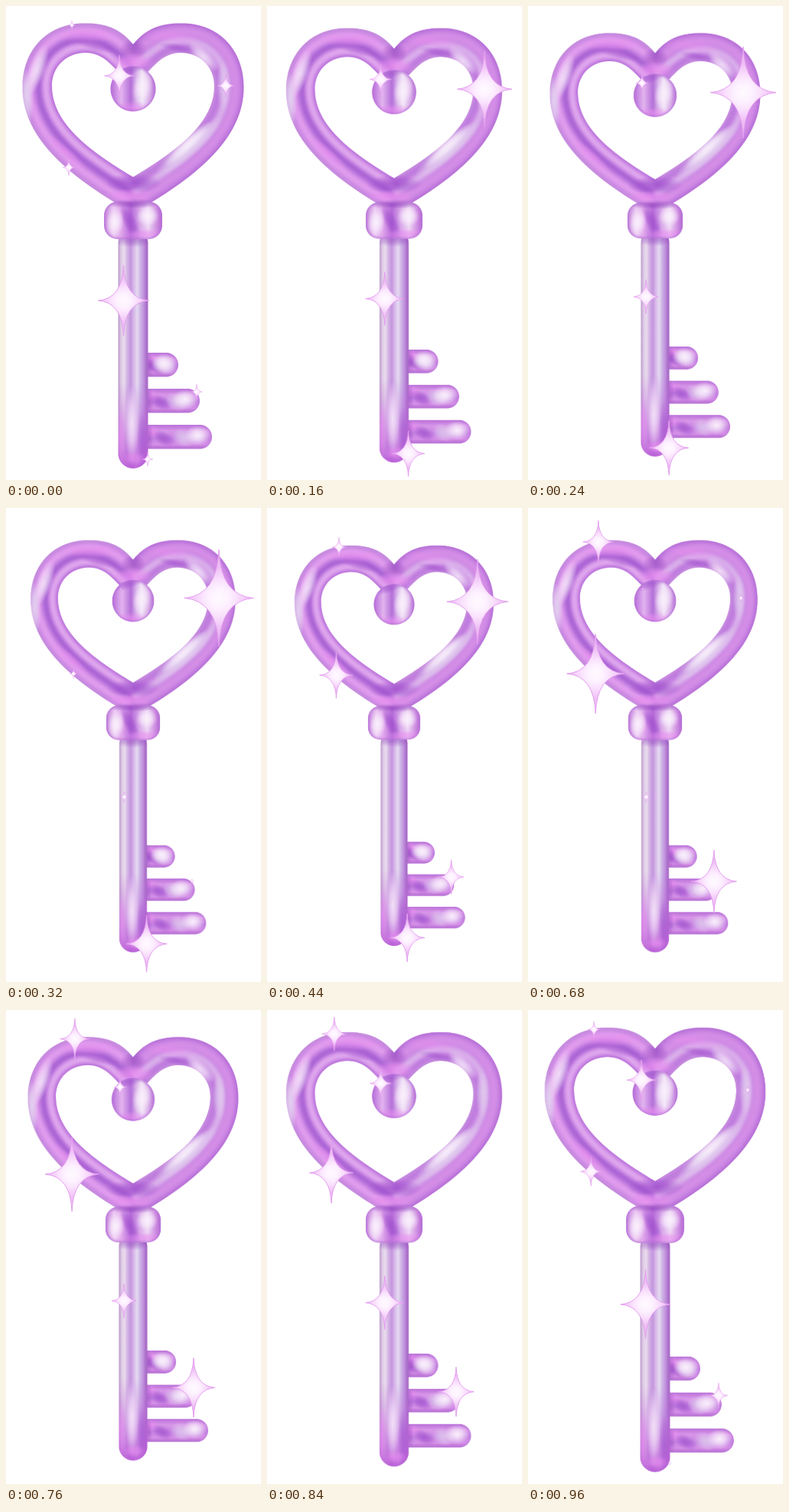
Recreate the animation shown at these times as an HTML page with a canvas. Size 333x618 px, loop 1 s.

```html
<!DOCTYPE html>
<html lang="en">
<head>
<meta charset="utf-8">
<title>Heart key</title>
<style>
html, body { margin: 0; width: 100%; height: 100%; overflow: hidden; background: #fff; }
canvas { display: block; }
</style>
</head>
<body>
<canvas id="stage"></canvas>
<script>
const W = 333, H = 618, LOOP = 1000, STEP = 40;
const CX = 166, CY = 285, RES = 2;

function setup(canvas, res) {
  canvas.width = W * res;
  canvas.height = H * res;
  const c = canvas.getContext('2d');
  c.scale(res, res);
  return c;
}

const stage = document.getElementById('stage');
const dpr = window.devicePixelRatio || 1;
const ctx = setup(stage, dpr);
stage.style.width = W + 'px';
stage.style.height = H + 'px';
const key = document.createElement('canvas');
const g = setup(key, RES);

// Left half of the heart, from the cleft to the lower tip.
const OUTER = [166, 50, 148, 28, 128, 22.5, 103, 22.5, 53, 22.5, 21.5, 58, 21.5, 106, 21.5, 175, 88, 226, 166, 270];
const INNER = [166, 96, 148, 100, 138, 61, 104, 61, 78, 61, 60, 80, 60, 104, 60, 152, 107, 188, 166, 223];

function halfHeart(k, mirror) {
  const p = OUTER.map((v, i) => v + (INNER[i] - v) * k);
  if (mirror) for (let i = 0; i < p.length; i += 2) p[i] = 2 * CX - p[i];
  const path = new Path2D();
  path.moveTo(p[0], p[1]);
  for (let i = 2; i < p.length; i += 6) path.bezierCurveTo(...p.slice(i, i + 6));
  return path;
}

function box(x, y, w, h, r) {
  const path = new Path2D();
  path.roundRect(x, y, w, h, r);
  return path;
}

function disc(x, y, r) {
  const path = new Path2D();
  path.arc(x, y, r, 0, 7);
  return path;
}

function inside(path, draw, rule = 'nonzero') {
  g.save();
  g.clip(path, rule);
  draw();
  g.restore();
}

function soft(path, color, width, blur) {
  g.filter = `blur(${blur * RES}px)`;
  g.strokeStyle = color;
  g.lineWidth = width;
  g.stroke(path);
  g.filter = 'none';
}

// Soft elliptical spot of one colour.
function glow(x, y, rx, ry, rgb, alpha = 1, turn = 0) {
  g.save();
  g.translate(x, y);
  g.rotate(turn);
  g.scale(rx, ry);
  const f = g.createRadialGradient(0, 0, 0, 0, 0, 1);
  f.addColorStop(0, `rgba(${rgb},${alpha})`);
  f.addColorStop(0.45, `rgba(${rgb},${alpha * 0.7})`);
  f.addColorStop(1, `rgba(${rgb},0)`);
  g.fillStyle = f;
  g.fillRect(-1, -1, 2, 2);
  g.restore();
}

function ramp(x0, y0, x1, y1, stops) {
  const f = g.createLinearGradient(x0, y0, x1, y1);
  stops.forEach(([at, color]) => f.addColorStop(at, color));
  return f;
}

const WHITE = '250,240,252', PALE = '228,214,240', PINK = '232,142,240',
      PURPLE = '158,78,204', DEEP = '140,62,186';

function drawHeart() {
  const shape = new Path2D();
  for (const k of [0, 1]) for (const m of [false, true]) shape.addPath(halfHeart(k, m));
  const band = (k, color, w, blur, mirror) => soft(halfHeart(k, mirror), color, w, blur);
  inside(shape, () => {
    g.fillStyle = '#ca84e4';
    g.fillRect(0, 0, W, 300);
    band(0.02, '#c58cdd', 6, 2, false);
    band(0.25, '#e09ced', 9, 2, false);
    band(0.55, '#a862d3', 7, 2.5, false);
    band(0.8, '#e0a9ee', 7, 2, false);
    band(1, '#b56fd8', 3, 1.5, false);
    band(0, '#b670d6', 6, 2, true);
    band(0.28, '#d48ee6', 9, 2, true);
    band(0.58, '#d9aeea', 9, 2.5, true);
    band(0.85, '#bd7cdc', 6, 2, true);
    band(1, '#c592dc', 3, 1.5, true);
    glow(40, 84, 11, 36, WHITE, 0.8, 0.35);
    glow(27, 118, 9, 38, PALE, 0.9, -0.05);
    glow(78, 190, 34, 7, PINK, 0.6, 0.72);
    glow(108, 38, 44, 10, PINK, 0.6);
    glow(118, 52, 32, 7, PURPLE, 0.5, 0.25);
    glow(215, 40, 42, 9, PINK, 0.5, 0.1);
    glow(225, 55, 26, 6, PURPLE, 0.5, 0.2);
    glow(258, 66, 26, 10, WHITE, 0.8, 0.75);
    glow(284, 104, 9, 34, PALE, 0.7);
    glow(238, 184, 58, 13, PALE, 1, -0.72);
    glow(238, 180, 44, 8, WHITE, 0.9, -0.74);
    glow(166, 56, 18, 14, DEEP, 0.6);
    glow(166, 73, 28, 12, PINK, 0.85);
    glow(166, 94, 32, 16, PURPLE, 0.6);
    glow(166, 231, 38, 13, PURPLE, 0.8);
    glow(160, 247, 34, 9, PINK, 0.75);
    glow(166, 259, 32, 8, DEEP, 0.6);
  }, 'evenodd');
}

function drawBall() {
  const shape = disc(166, 108, 29.5);
  inside(shape, () => {
    g.fillStyle = ramp(136, 0, 196, 0, [
      [0, '#b56bd8'], [0.24, '#e3b4ef'], [0.45, '#b470d9'], [0.58, '#dcb8ec'],
      [0.7, '#f2e6f7'], [0.86, '#d9afe9'], [1, '#b873d8']]);
    g.fillRect(136, 78, 60, 60);
    glow(178, 106, 13, 21, WHITE, 0.9, 0.2);
    glow(164, 133, 28, 9, PINK, 0.7);
    glow(158, 83, 26, 9, PURPLE, 0.6, -0.3);
    soft(shape, '#b972d9', 3, 1.5);
  });
}

function drawShaft() {
  inside(box(146.5, 290, 39, 313, 19.5), () => {
    g.fillStyle = ramp(146.5, 0, 185.5, 0, [
      [0, '#bb98cc'], [0.1, '#dfcce6'], [0.2, '#eadcee'], [0.3, '#d3b4e4'],
      [0.42, '#c495df'], [0.52, '#d8b8ea'], [0.64, '#e5dbf1'], [0.75, '#ccb2e5'],
      [0.86, '#c08fdd'], [0.94, '#aa70c9'], [1, '#a96bc6']]);
    g.fillRect(146, 290, 40, 314);
    g.fillStyle = ramp(0, 490, 0, 603, [
      [0, 'rgba(190,100,220,0)'], [0.5, 'rgba(190,100,220,.45)'], [1, 'rgba(186,92,216,.9)']]);
    g.fillRect(146, 490, 40, 114);
    glow(150, 560, 6, 40, PINK, 0.6);
    glow(178, 566, 7, 40, PURPLE, 0.5);
    glow(164, 545, 9, 52, WHITE, 0.85);
    glow(168, 590, 15, 9, PINK, 0.7);
    glow(166, 303, 30, 12, DEEP, 0.55);
  });
}

function drawCollar() {
  const shape = box(128, 255, 76, 49, 18);
  inside(shape, () => {
    g.fillStyle = ramp(128, 0, 204, 0, [
      [0, '#c485dc'], [0.16, '#ecc8f3'], [0.3, '#e0a6ec'], [0.46, '#b468d8'],
      [0.62, '#d9a8ea'], [0.76, '#efd9f5'], [0.9, '#d090e2'], [1, '#b46ad4']]);
    g.fillRect(128, 255, 76, 49);
    glow(162, 282, 9, 27, PURPLE, 0.75, -0.45);
    glow(142, 282, 12, 20, WHITE, 1, 0.1);
    glow(185, 274, 15, 14, WHITE, 1);
    glow(182, 298, 28, 8, PINK, 0.7);
    glow(166, 256, 42, 8, DEEP, 0.7);
    soft(shape, '#ba74d8', 3, 1.5);
  });
}

function drawTooth(y, right) {
  const shape = box(170, y, right - 170, 31.5, 15.75), mid = y + 16;
  inside(shape, () => {
    g.fillStyle = ramp(0, y, 0, y + 32, [
      [0, '#b96fd9'], [0.25, '#d896e8'], [0.55, '#c482e1'], [0.8, '#d690e8'], [1, '#ad64cc']]);
    g.fillRect(170, y, 110, 32);
    glow(188, y + 9, 14, 9, PINK, 0.8);
    glow(185 + (right - 185) * 0.25, mid + 2, 16, 9, PURPLE, 0.7, 0.5);
    glow(185 + (right - 185) * 0.56, mid + 1, 16, 12, PALE, 0.75, 0.4);
    glow(right - 19, mid - 2, 17, 13, WHITE, 1);
    glow(185, mid, 8, 20, DEEP, 0.5);
    soft(shape, '#c07ddc', 2.5, 1.2);
  });
}

drawTooth(452, 225);
drawTooth(499, 253);
drawTooth(546, 269);
drawHeart();
drawBall();
drawShaft();
drawCollar();

// Centre, largest half height, time of the peak, half life in ms.
const STARS = [
  [86, 25, 28, 690, 360],
  [82, 210.5, 52, 670, 380],
  [287, 104, 63, 320, 380],
  [148, 91, 27, 0, 330],
  [153.5, 384, 46, 0, 355],
  [249, 503, 41, 680, 380],
  [185, 591, 37, 310, 370]
];

function starPath(w, h) {
  const q = 0.05;
  ctx.beginPath();
  ctx.moveTo(0, -h);
  ctx.quadraticCurveTo(w * q, -h * q, w, 0);
  ctx.quadraticCurveTo(w * q, h * q, 0, h);
  ctx.quadraticCurveTo(-w * q, h * q, -w, 0);
  ctx.quadraticCurveTo(-w * q, -h * q, 0, -h);
  ctx.closePath();
}

function drawStar(x, y, h) {
  const w = h * 0.72;
  ctx.save();
  ctx.translate(x, y);
  starPath(w, h);
  const f = ctx.createRadialGradient(0, 0, 0, 0, 0, h * 0.65);
  f.addColorStop(0, '#fffaff');
  f.addColorStop(0.3, '#fdf2ff');
  f.addColorStop(0.55, '#fae2fd');
  f.addColorStop(1, '#eebcf5');
  ctx.fillStyle = f;
  ctx.fill();
  ctx.strokeStyle = '#e49fef';
  ctx.lineWidth = Math.min(1, 0.3 + h / 50);
  ctx.lineJoin = 'round';
  ctx.stroke();
  ctx.restore();
}

function render(now) {
  const t = Math.floor((now % LOOP) / STEP) * STEP;
  const s = 0.948 + 0.052 * Math.cos(2 * Math.PI * t / LOOP);
  ctx.fillStyle = '#fff';
  ctx.fillRect(0, 0, W, H);
  ctx.imageSmoothingQuality = 'high';
  ctx.drawImage(key, CX * (1 - s), CY * (1 - s), W * s, H * s);
  for (const [x, y, size, peak, life] of STARS) {
    const gap = Math.abs(t - peak), d = Math.min(gap, LOOP - gap);
    if (d < life) {
      const h = size * Math.cos(d / life * Math.PI / 2);
      drawStar(CX + (x - CX) * s, CY + (y - CY) * s, h);
    }
  }
}

const start = performance.now();
function tick() {
  render(performance.now() - start);
  requestAnimationFrame(tick);
}
tick();
</script>
</body>
</html>
```
